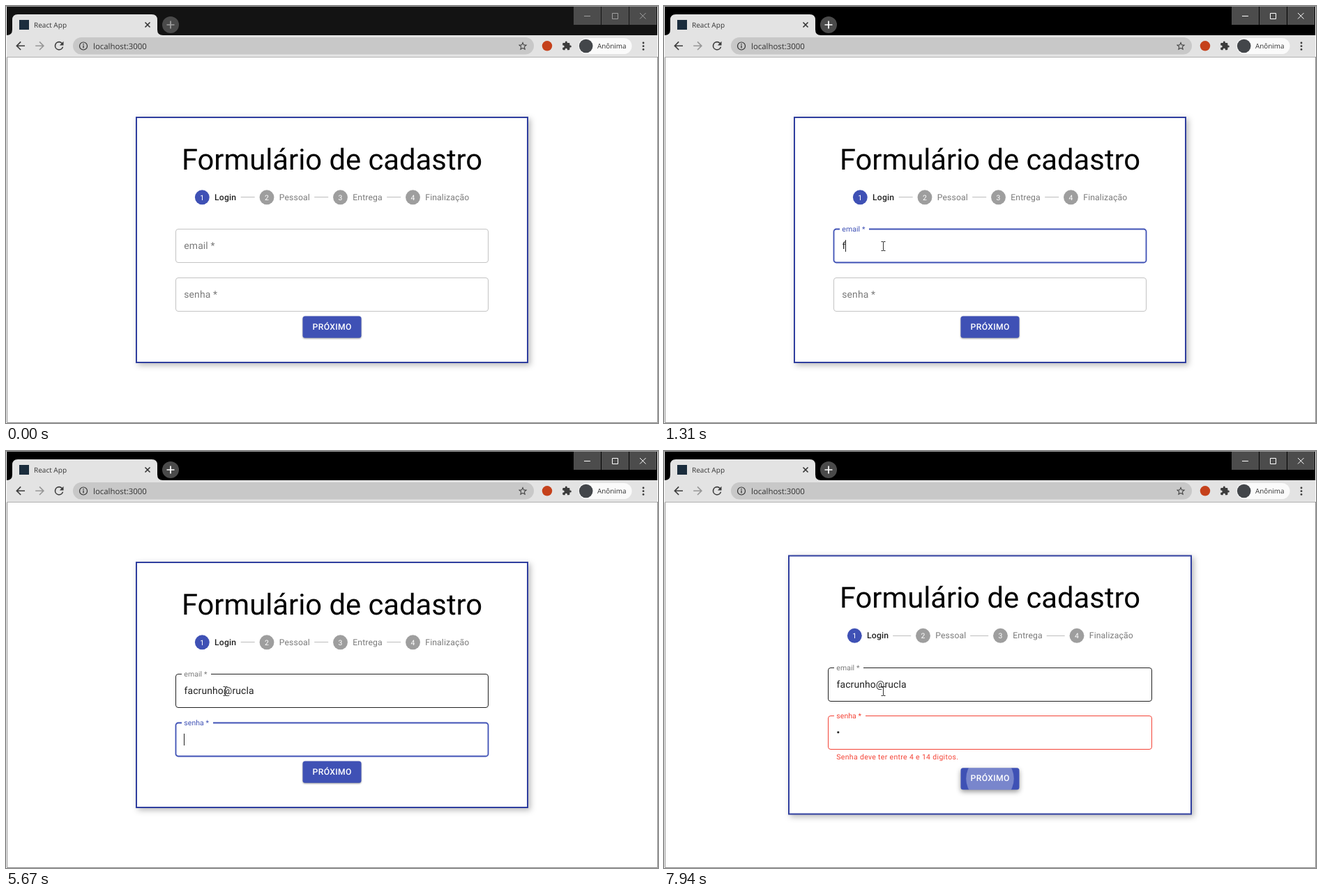
Write an HTML page that moves like this. It is 935 px wide and 599 px high and loops after 8 s.

```html
<!DOCTYPE html>
<html lang="pt-BR">
<head>
<meta charset="utf-8">
<title>Formulário de cadastro</title>
<style>
html, body { margin: 0; width: 100%; height: 100%; overflow: hidden; background: #fff; }
svg { display: block; width: 935px; height: 599px; }
text { font-family: Roboto, sans-serif; text-rendering: geometricPrecision; white-space: pre; }
.ui { font-family: "Open Sans", "Noto Sans", sans-serif; fill: #333; }
.line { fill: none; stroke: #333; }
.body { font-size: 13.92px; letter-spacing: .13px; fill: #212121; }
.label { letter-spacing: .00938em; }
.step { font-size: 12.18px; letter-spacing: .13px; fill: #7a7a7a; }
.num { font-size: 10.44px; fill: #fff; text-anchor: middle; }
.mid { text-anchor: middle; }
#card { fill: #fff; stroke: #303f9f; stroke-width: 2; filter: drop-shadow(3px 3px 4px rgba(0,0,0,.28)); }
#glow { fill: #fdfb78; mix-blend-mode: multiply; }
</style>
</head>
<body>
<svg viewBox="0 0 935 599">
  <rect width="935" height="599" fill="#fff"/>
  <path class="line" d="M1.5 73V598.5H934.5V73" style="stroke:#8c8c8c"/>

  <!-- browser chrome -->
  <rect id="bar" x="1" y="1" width="933" height="41"/>
  <path d="M0 .5H935" stroke="#9a9a9a"/>
  <path d="M1 42Q9 42 9 34V20Q9 12 17 12H209Q217 12 217 20V34Q217 42 225 42H934V73H1Z" fill="#e3e3e3"/>
  <path d="M1 73.5H934" stroke="#b0b0b0"/>
  <rect x="19" y="20" width="14" height="14" fill="#1b2d3d"/>
  <text class="ui" x="40" y="30.7" font-size="10.05">React App</text>
  <path class="line" d="M199.5 23.5l7 7m0-7l-7 7" stroke-width="1.6"/>
  <circle cx="236" cy="27" r="12" fill="#4a4a4a"/>
  <g fill="#4c4c4c">
    <rect x="814" y="1" width="39" height="26"/>
    <rect x="854" y="1" width="39" height="26"/>
    <rect x="894" y="1" width="39" height="26"/>
  </g>
  <g id="controls" fill="none">
    <path d="M829 14.5h9M869.5 10.5h8v8h-8zM909 10l8.5 8.5m0-8.5l-8.5 8.5"/>
    <path d="M230.500 27h11M236 21.500v11" stroke-width="1.7"/>
  </g>
  <rect x="96" y="45" width="661" height="24.500" rx="12.200" fill="#c8c8c8"/>
  <g fill="#3c3c3c">
    <path id="arrow" transform="translate(11 47.600) scale(.8)" d="M20 11H7.830l5.590-5.590L12 4l-8 8 8 8 1.410-1.410L7.830 13H20z"/>
    <use href="#arrow" transform="translate(69.200 0) scale(-1 1)" opacity=".45"/>
    <path transform="translate(66.500 47.600) scale(.8)" d="M17.650 6.350A7.960 7.960 0 0 0 12 4a8 8 0 1 0 7.730 10h-2.080A6 6 0 1 1 12 6c1.660 0 3.140.690 4.220 1.780L13 11h7V4z"/>
    <path transform="translate(733.500 50) scale(.63)" d="M22 9.240l-7.190-.620L12 2 9.190 8.630 2 9.240l5.460 4.730L5.820 21 12 17.270 18.180 21l-1.630-7.030zM12 15.400l-3.760 2.270 1-4.280-3.320-2.880 4.380-.380L12 6.100l1.710 4.040 4.380.380-3.320 2.880 1 4.280z"/>
    <path transform="translate(797 50) scale(.6)" d="M20.500 11H19V7c0-1.100-.9-2-2-2h-4V3.500a2.500 2.500 0 0 0-5 0V5H4c-1.100 0-2 .9-2 2v3.800h1.500a2.700 2.700 0 0 1 0 5.400H2V20c0 1.100.9 2 2 2h3.800v-1.500a2.700 2.700 0 0 1 5.400 0V22H17c1.100 0 2-.9 2-2v-4h1.500a2.500 2.500 0 0 0 0-5z"/>
    <circle cx="914" cy="53" r="1.400"/><circle cx="914" cy="57.700" r="1.400"/><circle cx="914" cy="62.400" r="1.400"/>
  </g>
  <circle class="line" cx="111" cy="57.500" r="5.500" stroke-width="1.200"/>
  <path class="line" d="M111 56.500v4M111 54v1.400" stroke-width="1.300"/>
  <text class="ui" x="125" y="61.600" font-size="11.400">localhost:3000</text>
  <circle cx="776" cy="57.300" r="7.200" fill="#c5411b"/>
  <rect x="821" y="46" width="76.500" height="23" rx="11.500" fill="#fafafa"/>
  <circle cx="831.700" cy="57.500" r="9.800" fill="#43464a"/>
  <text class="ui" x="848" y="61.200" font-size="9.900">Anônima</text>

  <!-- form -->
  <rect id="card"/>
  <text id="title" class="mid" x="467.500" font-size="41.760">Formulário de cadastro</text>
  <g id="stepper"></g>
  <g id="fields"></g>
  <text id="error" x="247.300" y="443" font-size="10.440" letter-spacing=".348" fill="#f44336">Senha deve ter entre 4 e 14 digitos.</text>
  <g id="button">
    <clipPath id="shape"><rect x="425.500" y="445.500" width="84" height="31.300" rx="3.500"/></clipPath>
    <rect id="face" x="425.500" y="445.500" width="84" height="31.300" rx="3.500" fill="#3f51b5"/>
    <circle id="ripple" cx="467.500" cy="461" fill="#fff" clip-path="url(#shape)"/>
    <text class="mid" x="467.700" y="464.700" font-size="12.180" font-weight="500" letter-spacing=".348" fill="#fff">PRÓXIMO</text>
  </g>

  <!-- pointer -->
  <g id="pointer">
    <circle id="glow" cx="-1" r="10.500"/>
    <path id="beam" class="line" d="M-3 -6.500h2.500l.5 .5.500-.5h2.500M0 -6V6M-3 6.500h2.500l.5-.5.500.5h2.500"/>
    <path id="tip" d="M0 0V15l3.500-3.300 2.400 5.300 2.200-1-2.400-5.100h4.800z" fill="#fff" stroke="#222" stroke-width=".9"/>
  </g>
</svg>
<script>
const LOOP = 8000, CLICK = 920, TAB = 5430, DOT = 6910, LEAVE = 7220;
const BLUE = '#3f51b5', RED = '#f44336', GRAY = '#7a7a7a';
const EMAIL = 'facrunho@rucla';
// [time, characters typed]
const KEYS = [[1310, 1], [1560, 2], [1790, 3], [2100, 4], [2330, 6], [2560, 7], [2710, 8],
  [3480, 9], [4480, 10], [4640, 11], [4870, 13], [5030, 14]];
const CARET_OFF = [[3170, 3480], [4020, 4480], [5980, 6520]];

const $ = id => document.getElementById(id);
const set = (node, attrs) => { for (const k in attrs) node.setAttribute(k, attrs[k]); };
const show = (node, on) => set(node, { visibility: on ? 'visible' : 'hidden' });
const add = (parent, tag, attrs = {}, text = '') => {
  const node = document.createElementNS('http://www.w3.org/2000/svg', tag);
  set(node, attrs);
  node.textContent = text;
  return parent.appendChild(node);
};
const clamp = v => Math.min(1, Math.max(0, v));
const span = (t, from, length) => clamp((t - from) / length);
const easeOut = p => 1 - (1 - p) ** 3;
const easeInOut = p => p * p * (3 - 2 * p);
const mix = (a, b, p) => a + (b - a) * p;

const steps = ['Login', 'Pessoal', 'Entrega', 'Finalização'].map((name, i) => {
  const g = add($('stepper'), 'g');
  add(g, 'circle', { r: 10.44, fill: i ? '#9e9e9e' : BLUE });
  add(g, 'text', { class: 'num', y: 3.8 }, i + 1);
  const label = add(g, 'text', { class: 'step', x: 17.8, y: 4.1 }, name);
  if (!i) label.style.cssText = 'fill:#212121;font-weight:500';
  return g;
});
const links = [0, 1, 2].map(() => add($('stepper'), 'path', { stroke: '#bdbdbd' }));

function makeField(name, gap) {
  const g = add($('fields'), 'g');
  const box = add(g, 'rect', { x: .5, y: .5, height: 48, rx: 3.5, fill: 'none' });
  const notch = add(g, 'rect', { x: 9, y: -1, width: gap, height: 4, fill: '#fff' });
  const label = add(g, 'text', { class: 'label', x: 12.3 }, name + ' *');
  const value = add(g, 'text', { class: 'body', x: 12.5, y: 29 });
  const caret = add(g, 'rect', { y: 16, width: 1, height: 17, fill: '#222' });
  return { g, box, notch, label, value, caret };
}
const email = makeField('email', 42), senha = makeField('senha', 45);
const squiggle = add(email.g, 'path', {
  d: 'M12.5 32' + 'q1 -2 2 0t2 0'.repeat(14), fill: 'none', stroke: '#e53935', 'stroke-width': 1
});
const dot = add(senha.g, 'circle', { cx: 14.8, cy: 24, r: 1.6, fill: '#212121' });

function drawField(f, s) {
  set(f.g, { transform: `translate(${s.x} ${s.y})` });
  const stroke = s.error ? RED : s.focus ? BLUE : s.hover ? '#212121' : '#c4c4c4';
  set(f.box, { width: s.width, stroke, 'stroke-width': s.focus ? 1.8 : 1 });
  show(f.notch, s.shrink > .3);
  set(f.label, {
    y: mix(29, 3.9, s.shrink), 'font-size': mix(13.92, 10.44, s.shrink),
    fill: s.error ? RED : s.focus ? BLUE : GRAY
  });
  set(f.caret, { x: Math.floor(12.5 + s.end) });
  show(f.caret, s.focus && s.blink);
}

function drawPointer(t) {
  const p = easeOut(span(Math.floor(t / 70) * 70, 0, 770));
  const x = mix(470, 314.5, p), y = mix(640, 345, p);
  const inside = top => x > 243 && x < 692 && y > top && y < top + 49;
  const over = { email: inside(320), senha: inside(390) };
  const text = over.email || over.senha;
  set($('pointer'), { transform: `translate(${x} ${y})` });
  show($('glow'), t < 1000);
  show($('beam'), text);
  show($('tip'), !text);
  return over;
}

function drawLayout(wide, active) {
  const dy = wide ? -9.5 : 0;
  set($('bar'), { fill: active ? '#000' : '#131313' });
  set($('controls'), { stroke: active ? '#fff' : '#a0a0a0' });
  set($('card'), wide ? { x: 179, y: 150.5, width: 577, height: 371 }
                      : { x: 187, y: 160, width: 561, height: 352 });
  set($('title'), { y: 234.8 + dy });
  const centers = wide ? [273.3, 371.5, 482.5, 592] : [281.3, 374, 479.5, 583.5];
  steps.forEach((g, i) => set(g, { transform: `translate(${centers[i]} ${274.8 + dy})` }));
  links.forEach((line, i) => {
    const end = centers[i + 1] - 17.3;
    set(line, { d: `M${end - (wide ? 26 : 20)} ${wide ? 265.5 : 274.5}H${end}` });
  });
  show($('error'), wide);
  set($('button'), { transform: `translate(0 ${wide ? 9.7 : 0})` });
}

function drawButton(t) {
  const lift = span(t, LEAVE, 250);
  $('face').style.filter =
    `drop-shadow(0 ${mix(1.3, 3, lift)}px ${mix(1.2, 3.5, lift)}px rgba(0,0,0,.4))`;
  const grow = easeInOut(span(t, LEAVE, 400));
  const pulse = 1 - .08 * easeInOut(span(t, LEAVE + 200, 1150));
  set($('ripple'), { r: 35.5 * grow * pulse, opacity: mix(.1, .3, grow) });
  show($('ripple'), t >= LEAVE);
}

function draw(t) {
  const wide = t >= LEAVE;
  drawLayout(wide, t >= CLICK);
  drawButton(t);
  const over = drawPointer(t);

  const typed = KEYS.reduce((n, [at, count]) => t >= at ? count : n, 0);
  const text = EMAIL.slice(0, typed);
  if (email.value.textContent !== text) email.value.textContent = text;
  const blink = !CARET_OFF.some(([a, b]) => t >= a && t < b);
  const x = wide ? 235 : 243, width = wide ? 464 : 448;

  drawField(email, {
    x, width, blink, y: wide ? 311 : 320, hover: over.email,
    focus: t >= CLICK && t < TAB, shrink: easeOut(span(t, CLICK, 200)),
    end: typed ? email.value.getComputedTextLength() : 0
  });
  drawField(senha, {
    x, width, blink, y: wide ? 380 : 390, hover: over.senha, error: wide,
    focus: t >= TAB && !wide, shrink: easeOut(span(t, TAB, 200)),
    end: t >= DOT ? 5 : 0
  });
  show(squiggle, t >= 4560 && t < TAB);
  show(dot, t >= DOT);
}

function tick() {
  draw(performance.now() % LOOP);
  requestAnimationFrame(tick);
}
tick();
</script>
</body>
</html>
```
